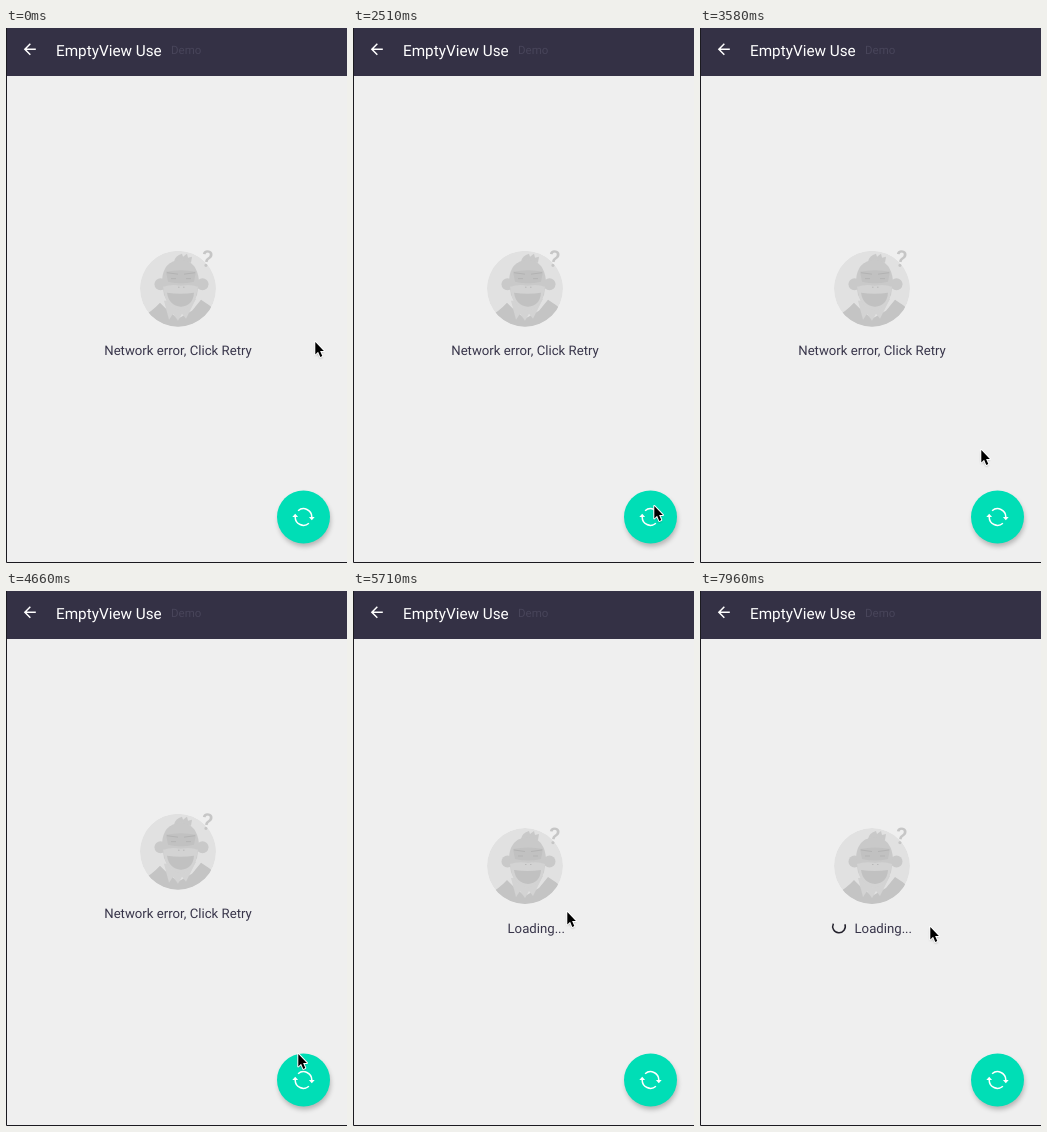
An HTML page for the animation above (8 s loop, 341x535 px).

```html
<!DOCTYPE html>
<html lang="en">
<head>
<meta charset="utf-8">
<title>Empty view</title>
<style>
html, body { margin: 0; width: 100%; height: 100%; overflow: hidden; background: #efefef; }
svg { display: block; width: 341px; height: 535px; font-family: Roboto, sans-serif; text-rendering: geometricPrecision; }
</style>
</head>
<body>
<svg viewBox="0 0 341 535">
  <defs>
    <clipPath id="disc"><circle r="38"/></clipPath>
    <filter id="soft" x="-50%" y="-50%" width="200%" height="200%"><feGaussianBlur stdDeviation="2.6"/></filter>
    <filter id="blur" x="-50%" y="-50%" width="200%" height="200%"><feGaussianBlur stdDeviation="1"/></filter>
    <path id="arrow" d="M.3 1V13.4L3.1 10.7 5.3 15.9 7.3 15 5.1 9.9H8.9Z"/>
    <g id="half">
      <path d="M-5.4-6.3A8.3 8.3 0 0 1 8.3 0" fill="none" stroke="#fff" stroke-width="1.5"/>
      <path d="M5.4 0H11.2L8.3 3.2Z" fill="#fff"/>
    </g>
  </defs>

  <rect width="341" height="535" fill="#efefef"/>
  <rect width="341" height="48" fill="#343145"/>
  <path d="M.5 0V534.5H341" fill="none" stroke="#1b1a20"/>
  <path transform="translate(23.8 21.3) scale(.75) translate(-12 -12)" fill="#fff"
    d="M20 11H7.83l5.59-5.59L12 4l-8 8 8 8 1.41-1.41L7.83 13H20z"/>
  <text x="50" y="27.5" font-size="15.3" fill="#fff">EmptyView Use</text>
  <text x="165" y="26" font-size="11.5" fill="#48455a">Demo</text>

  <g id="content">
    <g clip-path="url(#disc)">
      <circle r="38" fill="#e1e1e1"/>
      <path d="M-40 30Q-27 24-18 14L-11 21 0 30 14 22 23 11Q33 17 40 24V40H-40Z" fill="#c4c4c4"/>
      <path d="M-14 12L-9 31-5 25 0 32 4 25 8 30 18 10Z" fill="#d3d3d3"/>
    </g>
    <g fill="#c9c9c9">
      <circle cx="-17.5" cy="-4.5" r="6"/>
      <circle cx="24.5" cy="-4.5" r="6"/>
      <path d="M-4-27Q-3-33 4-35L5-32 9-35 10-31 14-32 13-26Z"/>
      <path d="M-16-8Q-15-28 3-29 19-28 21-8L19 6Q15 18 3 21-10 18-14 6Z"/>
    </g>
    <path d="M-15-2Q-6-5 3-3 12-5 20-2L18 8Q15 19 3 22-10 19-13 8Z" fill="#d3d3d3"/>
    <path d="M-12-17Q3-20 18-17L16-7Q3-4-10-7Z" fill="#c1c1c1"/>
    <path d="M-11-16L0-14.5M6-14.5L17-16M-7-10H-2M8-10H13" fill="none" stroke="#b3b3b3"/>
    <path d="M0-1.5H1.5M5-1.5H6.5" stroke="#b8b8b8"/>
    <path d="M-11 4Q3 6 16 4 15 17 3 18-9 17-11 4Z" fill="#c1c1c1"/>
    <text transform="translate(28 -22) rotate(8)" font-size="23" font-weight="500" text-anchor="middle" fill="#c6c6c6">?</text>
  </g>

  <text id="label" font-size="13.2" text-anchor="middle" fill="#38354a"/>
  <path id="spinner" fill="none" stroke="#24222d" stroke-width="1.5"/>

  <circle cx="298.5" cy="492.5" r="26" fill="#000" opacity=".25" filter="url(#soft)"/>
  <circle cx="297.5" cy="489" r="26.5" fill="#00deb6"/>
  <circle id="ripple" cx="297.5" cy="489" fill="#fff"/>
  <g transform="translate(297.5 489)">
    <use href="#half"/>
    <use href="#half" transform="rotate(180)"/>
  </g>

  <g id="cursor">
    <use href="#arrow" y="1.4" opacity=".4" filter="url(#blur)"/>
    <use href="#arrow" stroke="#fff" stroke-width="2" stroke-linejoin="round"/>
    <use href="#arrow"/>
  </g>
</svg>
<script>
const $ = id => document.getElementById(id);
const LOOP = 8000, TICK = 115; // the screen refreshes once per tick while something moves

// Pointer glides: start, ticks, where to, and the point that bends the way
const home = [309, 313];
const glides = [
  { start: 600, ticks: 1, to: [303, 313] },
  { start: 1070, ticks: 7, to: [301, 477], bend: [268, 395] },
  { start: 2990, ticks: 6, to: [281, 421], bend: [333, 411] },
  { start: 4660, ticks: 2, to: [295, 476] },
  { start: 4890, ticks: 5, to: [214, 342], bend: [206, 364] },
  { start: 5470, ticks: 1, to: [214, 320] },
  { start: 6060, ticks: 4, to: [230, 335] }
];

const LOADING = "Loading...", ERROR = "Network error, Click Retry", EMPTY = "There is no data, Click Retry";
// The spinner resumes from the seconds already spun
const states = [
  { start: 0, label: ERROR },
  { start: 2630, label: LOADING, spun: 0 },
  { start: 3580, label: ERROR },
  { start: 5710, label: LOADING, spun: 1 },
  { start: 6770, label: EMPTY },
  { start: 7610, label: LOADING, spun: 2 }
];

const ticksSince = (start, t) => Math.floor((t - start) / TICK);
const ease = u => u * u * (3 - 2 * u);

function pointer(t) {
  let from = home;
  for (const { start, ticks, to, bend = to } of glides) {
    if (t < start) break;
    const u = ease(Math.min(1, (ticksSince(start, t) + 1) / ticks)), v = 1 - u;
    from = from.map((p, i) => v * v * p + 2 * u * v * bend[i] + u * u * to[i]);
  }
  return from;
}

function arc(cx, cy, r, start, sweep) {
  const point = deg => {
    const a = deg * Math.PI / 180;
    return `${cx + r * Math.cos(a)} ${cy + r * Math.sin(a)}`;
  };
  return `M${point(start)}A${r} ${r} 0 ${sweep > 180 ? 1 : 0} 1 ${point(start + sweep)}`;
}

function draw(t) {
  $("cursor").setAttribute("transform", `translate(${pointer(t).map(Math.round)})`);

  const { start, label, spun } = states.findLast(s => s.start <= t);
  const middle = label === ERROR ? 260.7 : 275;
  $("content").setAttribute("transform", `translate(172 ${middle})`);
  $("label").textContent = label;
  $("label").setAttribute("x", label === LOADING ? 183.3 : 172);
  $("label").setAttribute("y", middle + 66.7);

  const ticks = ticksSince(start, t);
  const spin = spun + ticks * TICK / 1000;
  const turning = label === LOADING && ticks > 0;
  $("spinner").setAttribute("d", turning ? arc(139, 335.5, 6.3, 145 * spin, 97 * spin) : "");

  const press = ticksSince(2510, t);
  const rippling = press > 0 && press < 4;
  $("ripple").setAttribute("r", rippling ? Math.min(26.5, 12 * press) : 0);
  $("ripple").setAttribute("opacity", rippling ? .2 - .04 * press : 0);
}

const begin = performance.now();
function frame() {
  draw((performance.now() - begin) % LOOP);
  requestAnimationFrame(frame);
}
frame();
</script>
</body>
</html>
```
